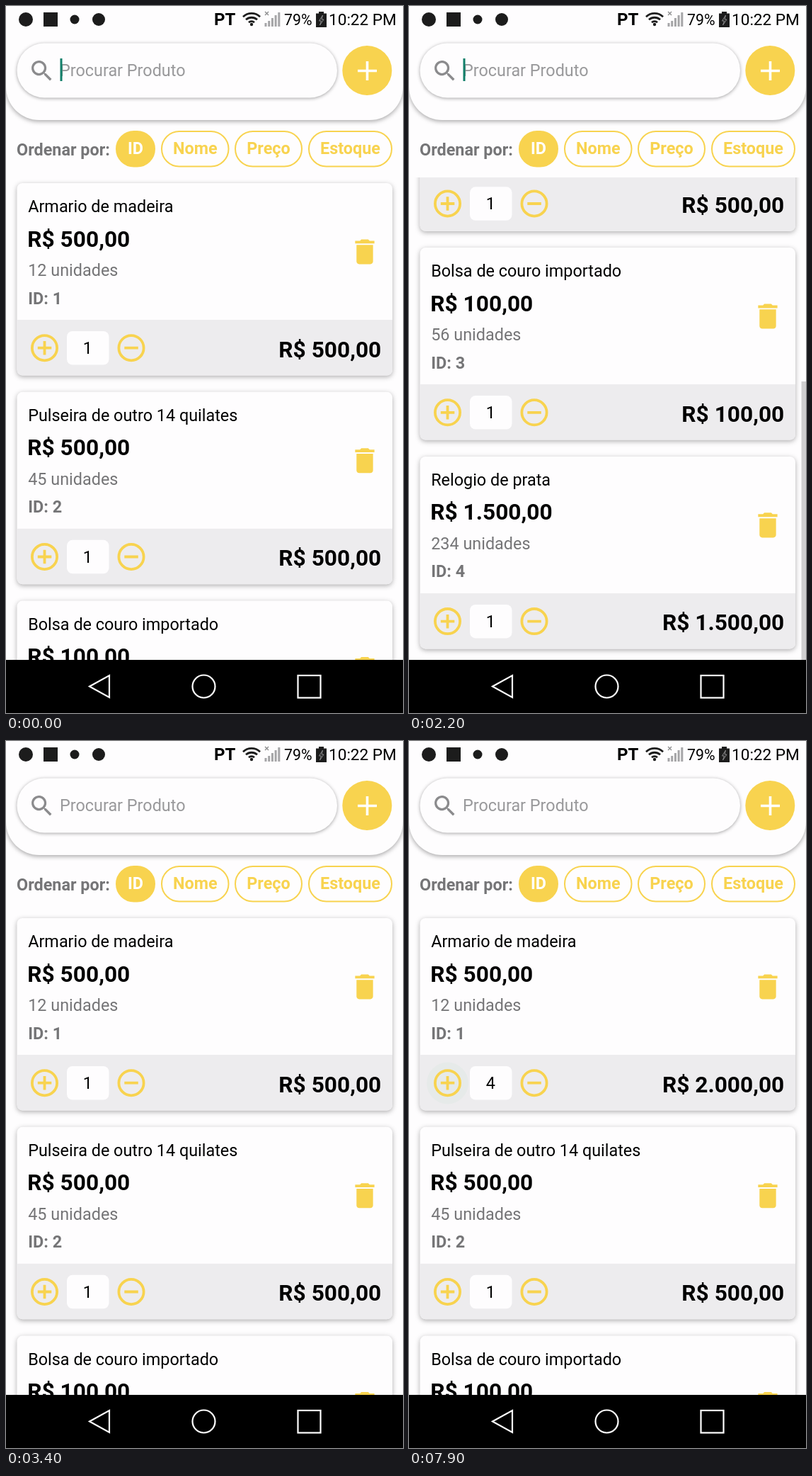
Animation of 561 by 998 pixels, one loop 8000 ms. Source, as an HTML page:

```html
<!DOCTYPE html>
<html lang="pt">
<head>
<meta charset="utf-8">
<title>Produtos</title>
<style>
@property --y { syntax: '<number>'; inherits: true; initial-value: 0; }
html, body { margin: 0; width: 100%; height: 100%; overflow: hidden; background: #fefdfe; }
svg { display: block; width: 561px; height: 998px; }
text { font: 23.4px Roboto, sans-serif; fill: #000; }
.bold { font-weight: 700; }
.price { font-size: 31.7px; font-weight: 700; }
.gray { fill: #757577; }
.hint { fill: #99999b; }
.gold { fill: #f8d34f; }
.line { fill: none; stroke: #f8d34f; }
.mid { text-anchor: middle; }
.end { text-anchor: end; }
.header { fill: #fefdfe; filter: drop-shadow(0 2px 3px rgba(0,0,0,.34)); }
.pill { fill: #fefdfe; filter: drop-shadow(0 1px 2.5px rgba(0,0,0,.36)); }
.card { fill: #fefdfe; filter: drop-shadow(0 2.5px 3.5px rgba(0,0,0,.32)); }

.cursor, .view, .bar, .ripple, .n { animation: 8s step-end infinite; }
.cursor { fill: #12806a; animation-name: blink; }
.view { animation-name: scroll; }
.items { transform: translateY(calc(var(--y) * -1px)); }
.bar { fill: rgba(0,0,0,.3); transform: translateY(calc(var(--y) * .5774px)); animation-name: bar; }
.ripple { fill: #e3e9e6; animation-name: ripple; }
.n1 { animation-name: n1; }
.n2 { animation-name: n2; }
.n3 { animation-name: n3; }
.n4 { animation-name: n4; }

@keyframes blink {
  0%, 10%, 22.5%, 35%, 47.5% { opacity: 1; }
  3.75%, 16.25%, 28.75%, 41.25%, 53.75%, 100% { opacity: 0; }
}
@keyframes scroll {
  0% { --y: 0; }
  16.25% { --y: 15; }
  17.5% { --y: 100; }
  18.75% { --y: 250; }
  20% { --y: 385; }
  21.25% { --y: 465; }
  22.5% { --y: 498.5; }
  28.75% { --y: 400; }
  30% { --y: 199; }
  31.25% { --y: 90; }
  32.5% { --y: 35; }
  33.75% { --y: 9; }
  35%, 100% { --y: 0; }
}
@keyframes bar {
  0% { opacity: 0; }
  16.25% { opacity: 1; }
  27.5% { opacity: .6; }
  28.75% { opacity: 1; }
  38.75% { opacity: .8; }
  40% { opacity: .5; }
  41.25% { opacity: .2; }
  42.5%, 100% { opacity: 0; }
}
@keyframes ripple {
  0% { opacity: 0; }
  65%, 76.25%, 90% { opacity: .6; }
  66.25%, 77.5%, 91.25% { opacity: 1; }
  71.25%, 82.5%, 97.5% { opacity: .6; }
  73.75%, 83.75% { opacity: .3; }
  75%, 85%, 100% { opacity: 0; }
}
@keyframes n1 { 0% { opacity: 1; } 67.5%, 100% { opacity: 0; } }
@keyframes n2 { 0% { opacity: 0; } 67.5% { opacity: 1; } 78.75%, 100% { opacity: 0; } }
@keyframes n3 { 0% { opacity: 0; } 78.75% { opacity: 1; } 92.5%, 100% { opacity: 0; } }
@keyframes n4 { 0% { opacity: 0; } 92.5%, 100% { opacity: 1; } }
</style>
</head>
<body>
<svg viewBox="0 0 561 998">
  <defs>
    <clipPath id="clip"><rect y="242" width="561" height="681"/></clipPath>
    <path id="trash" transform="translate(483.6 73.6) scale(1.948)" d="M6 19c0 1.1.9 2 2 2h8c1.1 0 2-.9 2-2V7H6zM19 4h-3.5l-1-1h-5l-1 1H5v2h14z"/>
  </defs>
  <rect width="561" height="998" fill="#fefdfe"/>

  <g class="view" clip-path="url(#clip)">
    <g class="items" id="items"></g>
    <rect class="bar" x="554.5" y="242" width="7" height="393"/>
  </g>

  <path class="header" d="M0 -9H561V114a47 47 0 0 1-47 47H47A47 47 0 0 1 0 114z"/>
  <rect class="pill" x="15.5" y="52.5" width="452.5" height="77" rx="38.5"/>
  <path fill="#8b8b8d" transform="translate(31.1 72.1) scale(1.63)" d="M15.5 14h-.79l-.28-.27A6.5 6.5 0 1 0 13.73 14.43l.27.28v.79l5 4.99L20.49 19zM9.5 14a4.5 4.5 0 1 1 0-9 4.5 4.5 0 0 1 0 9z"/>
  <text class="hint" x="76" y="99">Procurar Produto</text>
  <rect class="cursor" x="76.5" y="74" width="3" height="32"/>
  <circle class="gold" cx="510.3" cy="91" r="35"/>
  <path d="M497 91.5h27M510.5 78v27" stroke="#fff" stroke-width="3.6"/>

  <text class="bold gray" x="15" y="210.5">Ordenar por:</text>
  <g id="chips"></g>

  <g id="status">
    <circle cx="28" cy="19" r="10" fill="#1c1c1c"/>
    <rect x="53" y="9" width="20" height="20" fill="#1c1c1c"/>
    <circle cx="97" cy="19" r="6.5" fill="#1c1c1c"/>
    <circle cx="131" cy="19" r="9" fill="#1c1c1c"/>
    <text class="bold" x="294" y="27" style="font-size:24px">PT</text>
    <g fill="none" stroke="#1c1c1c" stroke-width="2.8">
      <path d="M335 15.2a17.5 17.5 0 0 1 24 0M339 19.3a12 12 0 0 1 16 0M343 23.3a6 6 0 0 1 8 0"/>
    </g>
    <circle cx="347" cy="26" r="2.2" fill="#1c1c1c"/>
    <path d="M367 29v-5M371.7 29v-8M376.4 29v-12M381.1 29v-16M385.8 29v-20" stroke="#a5a5a7" stroke-width="3"/>
    <path d="M366 8l5 5m0-5l-5 5" stroke="#8b8b8d" stroke-width="1.3"/>
    <text x="393" y="27" style="font-size:21.3px">79%</text>
    <path d="M442 8h7v2.5h4V30h-15V10.5h4z" fill="#1c1c1c"/>
    <path d="M447.5 13l-5 8h3l-2 6 5.500-8h-3z" fill="none" stroke="#8b8b8d"/>
    <text x="456" y="27" style="font-size:22.6px">10:22 PM</text>
  </g>

  <rect y="923" width="561" height="75"/>
  <g fill="none" stroke="#fff" stroke-width="2.2">
    <path d="M118 960.500L146 945v31z"/>
    <circle cx="279.500" cy="960.500" r="16"/>
    <rect x="412.500" y="945" width="32" height="31.500"/>
  </g>
</svg>
<script>
const products = [
  ['Armario de madeira', 500, 12],
  ['Pulseira de outro 14 quilates', 500, 45],
  ['Bolsa de couro importado', 100, 56],
  ['Relogio de prata', 1500, 234]
];
const pitch = 294.8;

const money = v => 'R$ ' + String(v).replace(/(\d)(?=\d{3}$)/, '$1.') + ',00';

const amount = (price, n, cls = '') => `<g class="${cls}">
  <text class="mid" x="115.3" y="241">${n}</text>
  <text class="price end" x="530.3" y="245.500">${money(price * n)}</text></g>`;

function card([name, price, stock], i) {
  const amounts = i ? amount(price, 1)
    : [1, 2, 3, 4].map(n => amount(price, n, 'n n' + n)).join('');
  return `<g transform="translate(0 ${250 + i * pitch})">
    <rect class="card" x="15.500" y="0" width="530.500" height="271.500" rx="8"/>
    <path fill="#edecee" d="M15.500 193H546V263.500a8 8 0 0 1-8 8H23.500a8 8 0 0 1-8-8z"/>
    <text x="31.2" y="41">${name}</text>
    <text class="price" x="30.3" y="89.500">${money(price)}</text>
    <text class="gray" x="31.2" y="131">${stock} unidades</text>
    <text class="gray bold" x="31.2" y="170.500">ID: ${i + 1}</text>
    <use href="#trash" class="gold"/>
    ${i ? '' : '<circle class="ripple" cx="54.500" cy="233" r="29.500"/>'}
    <g class="line" stroke-width="3.8">
      <circle cx="54.500" cy="232.700" r="17.600"/>
      <circle cx="177" cy="232.700" r="17.600"/>
      <path d="M44.800 232.700h19.500M54.500 223v19.500M167.300 232.700h19.500"/>
    </g>
    <rect x="86" y="209" width="59.500" height="47.500" rx="8" fill="#fefdfe"/>
    ${amounts}
  </g>`;
}

const chip = ([label, x, w], i) => `
  <rect class="${i ? 'line' : 'gold'}" x="${x}" y="177" width="${w}" height="49.500" rx="24.750"
    stroke="#f8d34f" stroke-width="2"/>
  <text class="bold mid" x="${x + w / 2}" y="209.300" style="fill:${i ? '#f8d34f' : '#fff'}">${label}</text>`;

const put = (id, html) => document.getElementById(id).innerHTML = html;
put('items', products.map(card).join(''));
put('chips', [['ID', 156, 54], ['Nome', 220, 94.5], ['Preço', 324, 94], ['Estoque', 428, 117]].map(chip).join(''));
</script>
</body>
</html>
```
